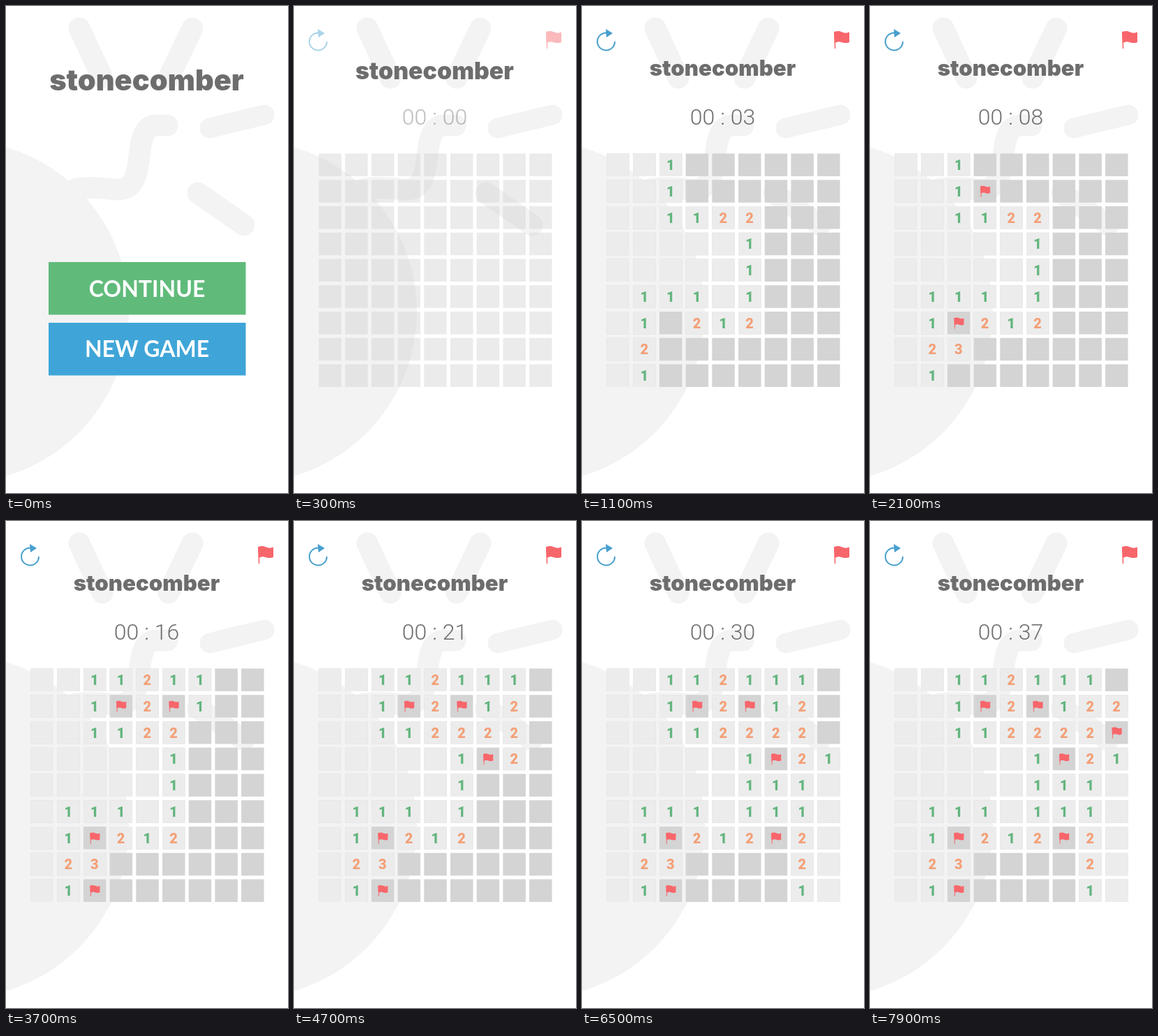
An HTML page that plays this animation: 404x698 px, repeating every 8000 ms.

```html
<!DOCTYPE html>
<html lang="en">
<head>
<meta charset="utf-8">
<title>stonecomber</title>
<style>
  html, body { margin: 0; width: 100%; height: 100%; overflow: hidden; background: #fff; }
  svg { display: block; width: 404px; height: 698px; }
  text { text-anchor: middle; }
  .label { font: 700 32px Lato, sans-serif; fill: #fff; }
  #title { font-family: Inter, sans-serif; font-weight: 900; fill: #6d6d6d; }
  #clock { font: 300 32px Roboto, sans-serif; fill: #6d6d6d; white-space: pre; }
  .digit { font: 900 20px Roboto, sans-serif; }
  .shade { fill: none; stroke: #f3f3f3; stroke-linecap: round; stroke-width: 31; }
</style>
</head>
<body>
<svg viewBox="0 0 404 698">
  <defs>
    <g id="flag" fill="#f7666b">
      <path d="M0 1H1.6L2.4 25H.8Z"/>
      <path d="M0 1C5-.8 9 0 12 1.5S18 3 22 1.5V16C18 17.6 14 17.2 11 16S5 15 1 17Z"/>
    </g>
  </defs>

  <circle cx="-70" cy="438" r="246" fill="#f3f3f3"/>
  <g class="shade">
    <path d="M100 262C130 258 148 263 160 263C185 263 188 240 191 215C194 188 198 171 217 171H231"/>
    <path d="M105 32L138 103M267 32L233 103M275 268L341 314"/>
    <path d="M292 175L370 156" stroke-width="29"/>
  </g>

  <g id="menu">
    <path d="M61 367H343.5V442.5H61Z" fill="#60bb7b"/>
    <path d="M61 454H343.5V529.5H61Z" fill="#3fa5d8"/>
    <text class="label" x="202" y="416.5">CONTINUE</text>
    <text class="label" x="202" y="503">NEW GAME</text>
  </g>

  <g id="game">
    <path d="M35 38.5A12.5 12.5 0 1 0 47 51" fill="none" stroke="#479fcd" stroke-width="2"/>
    <path d="M34 33L44 39L35 45Z" fill="#479fcd"/>
    <use href="#flag" x="361" y="36"/>
    <text id="clock" x="201.5" y="169.5"></text>
    <g id="board"></g>
  </g>
  <text id="title" x="201.5">stonecomber</text>
</svg>

<script>
const LOOP = 8000, PLAY_START = 500, TICK = 200;
const $ = id => document.getElementById(id);

// F = flag, # = stays closed, . = empty
const layout = [
  '..112111#',
  '..1F2F122',
  '..112222F',
  '.....1F21',
  '.....111.',
  '.111.111.',
  '.1F212F2.',
  '.23####2.',
  '.1F####1.'
];

// Single taps, keyed by row and column
const taps = {
  '13': 1300, '62': 1700, '72': 1950,
  '82': 2250, '03': 2450, '04': 2650, '14': 2850, '15': 3050,
  '05': 3250, '06': 3400, '16': 3600,
  '07': 3800, '17': 3950, '26': 4100, '27': 4250, '36': 4400, '37': 4550,
  '46': 5050, '56': 6050, '66': 6250, '28': 6850, '18': 7550
};

// Cells without a tap open in a wave around one of two blank cells
function openTime(row, col) {
  const tap = taps[`${row}${col}`];
  if (tap) return tap;
  return col > 6 ? 5750 + 25 * Math.abs(row - 5)
                 : 600 + 25 * Math.hypot(row - 4, col - 3);
}

function add(tag, attrs, text = '') {
  const el = document.createElementNS('http://www.w3.org/2000/svg', tag);
  for (const key in attrs) el.setAttribute(key, attrs[key]);
  el.textContent = text;
  $('board').append(el);
  return el;
}

const cells = [];
layout.forEach((line, row) => [...line].forEach((mark, col) => {
  const x = 35.5 + 37.7 * col, y = 211.5 + 37.75 * row;
  const tile = fill => add('rect', { x, y, width: 32.5, height: 32.5, fill });
  tile('#d4d4d4');
  if (mark === '#') return;

  const shown = [];
  if (mark === 'F') {
    shown.push(add('use', { href: '#flag', transform: `translate(${x + 9.5} ${y + 8.5}) scale(.64)` }));
  } else {
    shown.push(tile('#ececec'));
    if (mark !== '.') {
      shown.push(add('text', {
        class: 'digit', x: x + 16, y: y + 23.5, fill: mark === '1' ? '#63b57e' : '#f3a078'
      }, mark));
    }
  }
  cells.push({ time: openTime(row, col), shown });
}));

const progress = (t, from, to) => Math.min(1, Math.max(0, (t - from) / (to - from)));
const ease = p => p * p * (3 - 2 * p);

function draw(t) {
  const shift = ease(progress(t, 100, 400));
  $('title').setAttribute('y', 121 - 21 * shift);
  $('title').style.fontSize = `${41.5 - 10.3 * shift}px`;
  $('menu').style.opacity = 1 - progress(t, 100, 280);
  $('game').style.opacity = progress(t, 200, 420);

  const seconds = Math.max(0, Math.floor((t - PLAY_START) / TICK));
  $('clock').textContent = `00 : ${String(seconds).padStart(2, '0')}`;

  for (const { time, shown } of cells) {
    const open = progress(t, time, time + 90);
    for (const el of shown) el.style.opacity = open;
  }
}

function frame() {
  draw(performance.now() % LOOP);
  requestAnimationFrame(frame);
}
frame();
</script>
</body>
</html>
```
